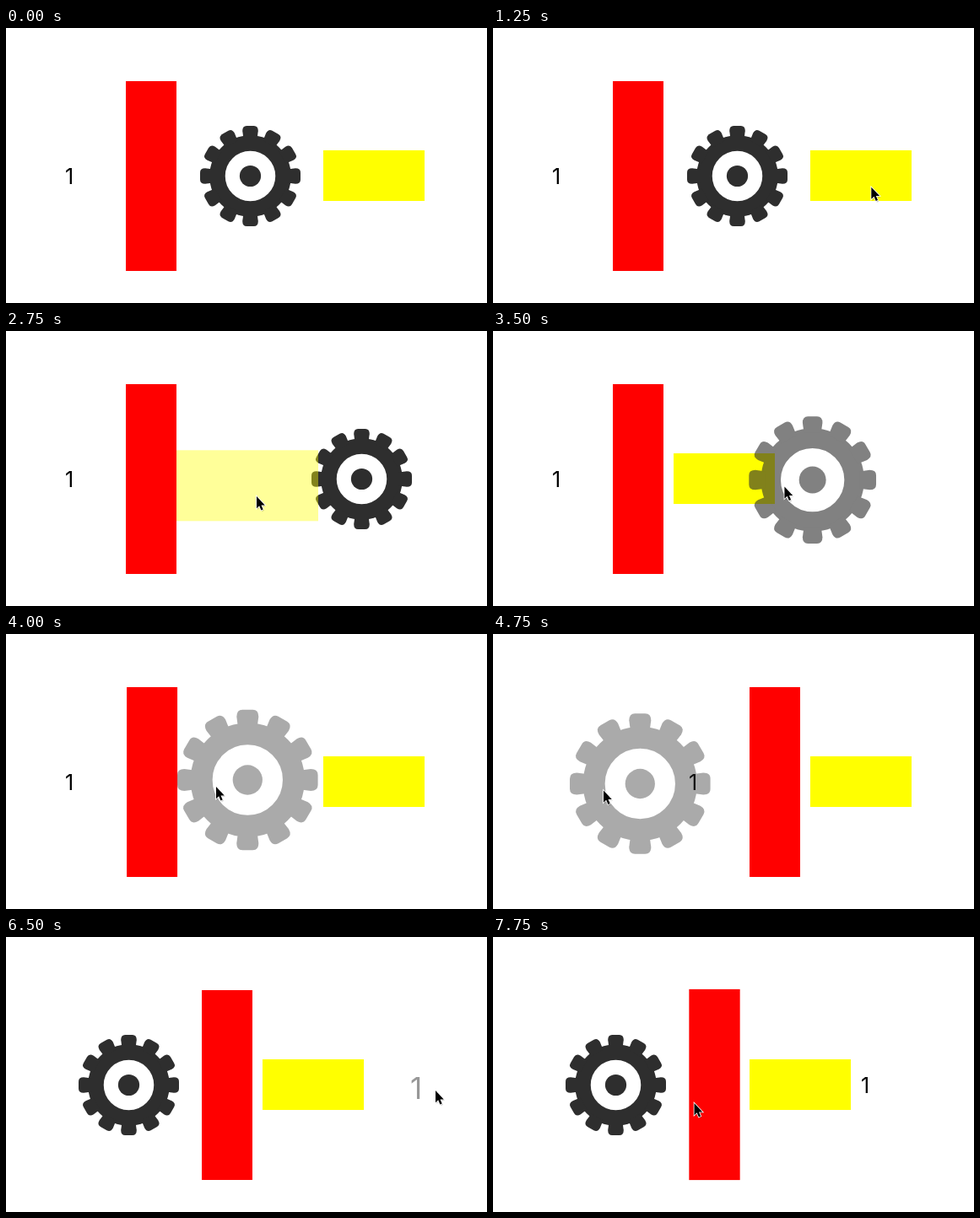
An HTML page for the animation above (8 s loop, 570x326 px).

```html
<!DOCTYPE html>
<html lang="en">
<head>
<meta charset="utf-8">
<title>Drag to reorder</title>
<style>
  html, body { margin: 0; width: 100%; height: 100%; overflow: hidden; background: #fff; }
  svg { display: block; width: 570px; height: 326px; }
  text { font: 25px Inter, "Open Sans", sans-serif; }
</style>
</head>
<body>
<svg viewBox="0 0 570 326">
  <defs>
    <path id="arrow" d="M0 0V14.2L3.2 11.2 5.4 16.4 7.7 15.4 5.5 10.4H9.8Z"/>
    <path id="tooth" d="M-8 -44L-9.3 -53.5Q-9.3 -59.5 -4.3 -59.5H4.3Q9.3 -59.5 9.3 -53.5L8 -44Z"/>
  </defs>
  <g id="items">
    <g id="label"><text x="-30" y="9.3">1</text></g>
    <g id="bar"><rect x="-30" y="-112.5" width="60" height="225" fill="#f00"/></g>
    <g id="gear" fill="#2e2e2e">
      <g id="wheel" transform="translate(.5 0)">
        <circle r="39" fill="none" stroke="#2e2e2e" stroke-width="18.5"/>
        <circle r="12.6"/>
      </g>
    </g>
    <g id="card"><rect x="-60" y="-30.5" width="120" height="60" fill="#ff0"/></g>
  </g>
  <g id="cursor">
    <use href="#arrow" x="1.2" y="1.6" opacity=".2"/>
    <use href="#arrow" stroke="#fff" stroke-width="1.6" paint-order="stroke"/>
  </g>
</svg>
<script>
const LOOP = 8000, STEP = 250, SLIDE = 250, LIFT = 300;
const LEFT = 70, GAP = 12, MID = 175.5;
const $ = id => document.getElementById(id);

for (let i = 0; i < 12; i++) {
  const tooth = document.createElementNS("http://www.w3.org/2000/svg", "use");
  tooth.setAttribute("href", "#tooth");
  tooth.setAttribute("transform", `rotate(${i * 30})`);
  $("wheel").append(tooth);
}

const widths = { label: 60, bar: 60, gear: 150, card: 120 };

// Neighbours that trade places: time, index of the left one
const swaps = [[1958, 2], [3600, 2], [3988, 1], [4238, 0], [5880, 1], [6130, 2]];

// While held, an item follows the pointer at an offset
const drags = [
  { id: "card", grab: 1510, drop: 2750, dx: [25, -11], dy: -12 },
  { id: "gear", grab: 3300, drop: 4800, dx: [31, 43], dy: -8 },
  { id: "label", grab: 5550, drop: 6500, dx: [12, 12], dy: -3.5 },
  { id: "bar", grab: 7746, drop: LOOP, dx: [24, 24], dy: -22 }
];

// Pointer stops: time, x, y
const SHOW = 750;
const stops = [
  [SHOW, 509, 192], [1500, 418, 187], [2000, 423, 187], [2750, 297, 196],
  [3300, 384, 186], [4000, 249, 181], [4500, 129, 184], [4750, 131, 185.5],
  [5250, 250, 179], [5500, 250, 179], [5750, 267.5, 177],
  [6400, 509, 182], [6750, 509, 182], [7500, 238.5, 197]
];

const clamp = p => Math.min(1, Math.max(0, p));
const mix = (a, b, p) => a + (b - a) * p;
const smooth = p => (p = clamp(p)) * p * (3 - 2 * p);

function pointerAt(t) {
  const i = Math.max(1, stops.findIndex(s => s[0] > t));
  const [a, b] = t < stops.at(-1)[0] ? [stops[i - 1], stops[i]] : stops.slice(-2);
  const p = clamp((t - a[0]) / (b[0] - a[0]));
  return [mix(a[1], b[1], p), mix(a[2], b[2], p)];
}

function centres(order) {
  const out = {};
  let x = LEFT;
  for (const id of order) {
    out[id] = x + widths[id] / 2;
    x += widths[id] + GAP;
  }
  return out;
}

function slotsAt(t) {
  const order = Object.keys(widths), slots = centres(order);
  for (const [time, i] of swaps) {
    order.splice(i, 2, order[i + 1], order[i]);
    const next = centres(order);
    for (const id of order) slots[id] = mix(slots[id], next[id], smooth((t - time) / SLIDE));
  }
  return slots;
}

function draw(t) {
  const slots = slotsAt(t), [px, py] = pointerAt(t);
  for (const { id, grab, drop, dx, dy } of drags) {
    const el = $(id), held = t > grab ? 1 - smooth((t - drop) / SLIDE) : 0;
    const lift = held * clamp((t - grab) / LIFT);
    const offset = mix(...dx, clamp((t - grab) / (drop - grab)));
    const x = mix(slots[id], px + offset, held), y = mix(MID, py + dy, held);
    el.setAttribute("transform", `translate(${x} ${y}) scale(${1 + .4 * lift})`);
    el.setAttribute("opacity", 1 - .6 * lift);
    if (held && el.nextElementSibling) $("items").append(el);
  }
  $("cursor").setAttribute("transform", `translate(${px} ${py})`);
  $("cursor").setAttribute("visibility", t < SHOW ? "hidden" : "visible");
}

// Four pictures a second, like a slow screen recording
const start = performance.now();
function tick() {
  const t = (performance.now() - start) % LOOP;
  draw(Math.floor(t / STEP) * STEP);
  requestAnimationFrame(tick);
}
tick();
</script>
</body>
</html>
```
